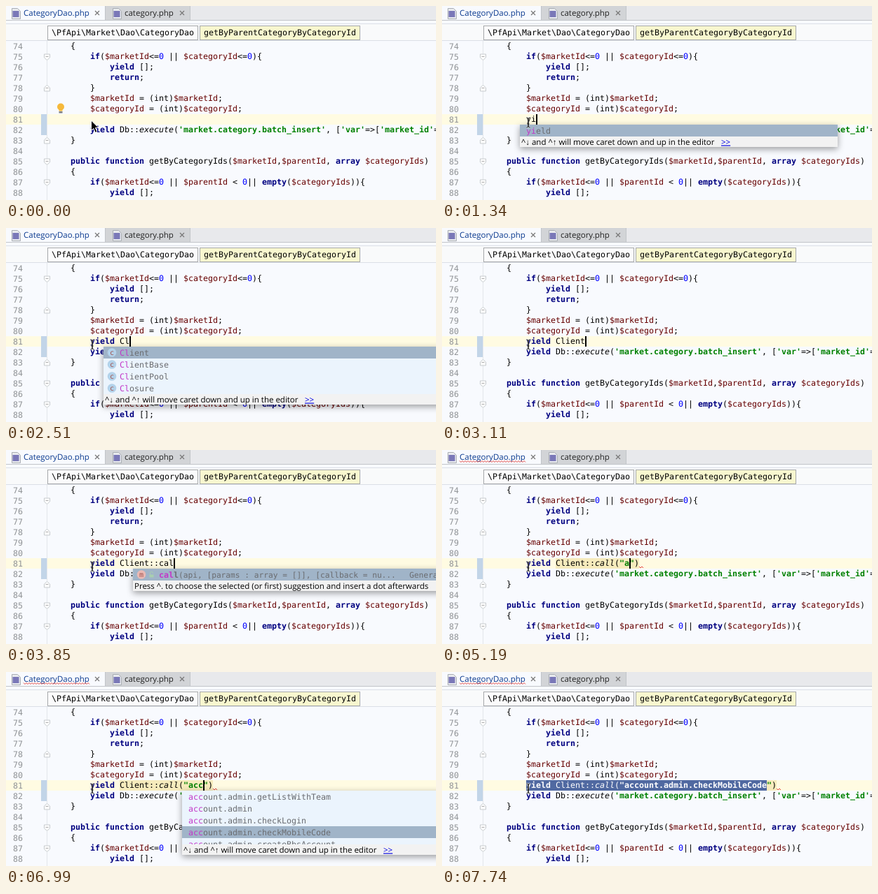
An HTML page for the animation above (8 s loop, 613 by 278 pixels).

```html
<!DOCTYPE html>
<html lang="en">
<head>
<meta charset="utf-8">
<style>
html, body { margin: 0; width: 100%; height: 100%; overflow: hidden; background: #f8fafe; }
svg { display: block; width: 613px; height: 278px; }
text { white-space: pre; text-rendering: geometricPrecision; font: 11.63px "DejaVu Sans Mono", monospace; }
.ui { font: 500 11.5px "Open Sans", sans-serif; }
.kw { fill: #000080; font-weight: bold; }
.var { fill: #660000; }
.num { fill: #0000ff; }
.str { fill: #008000; font-weight: bold; }
.call { font-style: italic; }
.item { fill: #6a6c70; }
.bold { font-weight: bold; }
.hit { fill: #c238c8; }
.picked text, .picked tspan { fill: #fff; }
.popup { filter: drop-shadow(0 3px 5px rgba(0, 0, 0, .38)); }
</style>
</head>
<body>
<svg viewBox="0 0 613 278" xmlns="http://www.w3.org/2000/svg">
  <g id="back"></g>
  <g id="live"></g>
</svg>
<script>
const LOOP = 8000, CHAR = 7, LEFT = 64, ROW = 15, FIRST = 74, LIST_ROW = 17;
const INDENT = 8, TYPED = 81;

const colX = c => LEFT + c * CHAR;
const rowY = n => 50 + (n - FIRST) * ROW;
const esc = s => s.replace(/&/g, '&amp;').replace(/</g, '&lt;').replace(/>/g, '&gt;');
const rect = (x, y, w, h, fill, more = '') =>
  `<rect x="${x}" y="${y}" width="${w}" height="${h}" fill="${fill}" ${more}/>`;
const path = (d, stroke, more = 'fill="none"') => `<path d="${d}" stroke="${stroke}" ${more}/>`;
const label = (x, y, body, more = '') => `<text x="${x}" y="${y}" ${more}>${body}</text>`;
const span = (cls, s) => `<tspan class="${cls}">${esc(s)}</tspan>`;

const TOKEN = /('[^']*'|"[^"]*")|(\$\w+)|\b(yield|return|if|public|function|empty|array)\b|(\b\d+\b)|((?<=::)\w+(?=\([^)]))/g;
const CLASSES = ['str', 'var', 'kw', 'num', 'call'];

function paint(code) {
  let out = '', last = 0;
  for (const m of code.matchAll(TOKEN)) {
    out += esc(code.slice(last, m.index)) + span(CLASSES[m.slice(1).findIndex(Boolean)], m[0]);
    last = m.index + m[0].length;
  }
  return out + esc(code.slice(last));
}
const codeLine = (n, indent, code) => label(colX(indent), rowY(n) + 11.4, paint(code));

function wave(x, y, w) {
  let d = `M${x} ${y}`;
  for (let i = 2; i <= w; i += 2) d += `L${x + i} ${y + (i % 4 ? 2 : 0)}`;
  return path(d, '#e0302a', 'fill="none" stroke-width=".9"');
}

const source = [
  [4, '{'],
  [8, 'if($marketId<=0 || $categoryId<=0){'],
  [12, 'yield [];'],
  [12, 'return;'],
  [8, '}'],
  [8, '$marketId = (int)$marketId;'],
  [8, '$categoryId = (int)$categoryId;'],
  [8, ''],
  [8, "yield Db::execute('market.category.batch_insert', ['var'=>['market_id'=>$marketId"],
  [4, '}'],
  [4, ''],
  [4, 'public function getByCategoryIds($marketId,$parentId, array $categoryIds)'],
  [4, '{'],
  [8, 'if($marketId<=0 || $parentId < 0|| empty($categoryIds)){'],
  [12, 'yield [];'],
];

function fold(n, closing) {
  const y = rowY(n) + 8, s = closing ? -1 : 1;
  return path(`M54.5 ${y - 4 * s}h8v${5 * s}l-4 ${3.5 * s}l-4 ${-3.5 * s}z`, '#c6cacd', 'fill="#fff"') +
    path(`M56.5 ${y - .5}h4`, '#aaa');
}

function tab(x, name, fill, closeX) {
  return path(`M${x} 3.5h8l4 4v11h-12z`, '#a9adb3', 'fill="#e9ebee"') +
    rect(x + 1, 7, 9, 9, '#7a78b8') +
    label(x + 16.5, 14, name, `class="ui" fill="${fill}"`) +
    path(`M${closeX - 3} 7l6 6m0-6l-6 6`, '#777', 'fill="none" stroke-width="1.2"');
}

function crumb(x, w, name, fill) {
  return rect(x - .5, 28.5, w + 1, 20, fill, 'stroke="#a6a8aa"') + label(x + 5, 42, name);
}

function backdrop() {
  let s = rect(0, 0, 613, 278, '#f8fafe') + rect(0, 25, 613, 24, '#f9fafb') +
    rect(0, 0, 613, 21, '#e8e9ec') + rect(0, 0, 141, 21, '#f8fafe') +
    rect(141, 0, 122, 21, '#d2d4d7') +
    path('M141.5 0v21M262.5 0v21M0 20.5h613', '#c2c5c9') +
    path('M0 25.5h613M0 49.5h613', '#dbdfe6') +
    tab(8.5, 'CategoryDao.php', '#0b3a8f', 130) +
    tab(152.5, 'category.php', '#222', 251) +
    crumb(60, 213, '\\PfApi\\Market\\Dao\\CategoryDao', '#fbfbfc') +
    crumb(277, 227, 'getByParentCategoryByCategoryId', '#f8f7cf') +
    rect(0, rowY(TYPED), 613, ROW, '#fffbe2') +
    path('M58.5 50v228', '#e3e6ea') +
    rect(50, rowY(TYPED), 8, 2 * ROW, '#c2d5e8');
  source.forEach(([indent, code], i) => {
    const n = FIRST + i;
    s += label(10, rowY(n) + 12, n, 'fill="#909396"') + codeLine(n, indent, code);
  });
  return s + fold(75) + fold(78, true) + fold(83, true) + fold(85) + fold(87);
}

const DOT = 'Press ^. to choose the selected (or first) suggestion and insert a dot afterwards';
const MOVE = '^↓ and ^↑ will move caret down and up in the editor';
const lists = {
  word: { x: 111, w: 453, pad: 9, hint: MOVE,
    rows: ['yield', 'yaml_emit', 'yaml_emit_file', 'yaml_parse', 'yaml_parse_file'] },
  type: { x: 139, w: 490, pad: 23, icons: 'c', hint: MOVE,
    rows: ['Client', 'ClientBase', 'ClientPool', 'Closure', 'Category', 'Config'] },
  method: { x: 181, w: 450, pad: 37, icons: 'm', hint: DOT,
    rows: ['call|(api, [params : array = []], [callback = nu...', 'close|()', 'config|(name)', 'connect|()', 'create|()'] },
  api: { x: 251, w: 380, pad: 9, hint: MOVE,
    rows: ['getListWithTeam', '', 'checkLogin', 'checkMobileCode', 'createBbsAccount']
      .map(s => 'account.admin' + (s && '.' + s)) },
};

function badge(x, y, letter) {
  const method = letter === 'm';
  let s = `<circle cx="${x}" cy="${y}" r="6.3" fill="${method ? '#eab9b4' : '#b3d2ea'}"/>` +
    label(x, y + 3.5, letter, 'text-anchor="middle" fill="#a0524e" style="font-size:10px"');
  if (method) s += rect(x + 11.5, y, 6, 4, '#a9cfb0') +
    path(`M${x + 12.5} ${y}v-2a2 2 0 0 1 4 0`, '#a9cfb0');
  return s;
}

function popup({ x, w, pad, icons, hint, rows }, prefix, sel) {
  const top = rowY(TYPED) + ROW, shown = rows.filter(r => r.startsWith(prefix));
  const h = Math.min(shown.length * LIST_ROW, 77), end = top + h;
  let s = rect(x, top, w, h + 15, '#ebf4fd') + rect(x, top + sel * LIST_ROW, w, LIST_ROW, '#a0b4c8');
  shown.forEach((row, i) => {
    const y = top + i * LIST_ROW, [name, tail = ''] = row.split('|'), n = prefix.length;
    const small = 'class="item" style="font-size:11.2px"';
    if (icons) s += badge(x + 12, y + 8.5, icons);
    s += label(x + pad, y + 12.5, span('hit', name.slice(0, n)) + esc(name.slice(n)),
        `class="item ${icons === 'm' ? 'bold' : ''}"`) +
      label(x + pad + name.length * CHAR, y + 12.5, esc(tail), small) +
      (icons === 'm' ? label(575, y + 12.5, 'General', small) : '');
  });
  s += rect(x, end, w, 15, '#f2f2f2') + label(x + 2, end + 11.5, esc(hint), 'class="ui"');
  if (hint === MOVE) s += label(x + 287, end + 11.5, '&gt;&gt;',
    'class="ui" fill="#0000e0" text-decoration="underline"');
  return `<g class="popup">${s}</g>`;
}

// Each step: start, code, caret column (-1 hides it), list name, list row, selected columns
const steps = [[0, '', -1], [450, '', -1]];
function type(times, base, word, list = '') {
  times.forEach((t, i) => {
    const code = base + word.slice(0, i + 1);
    steps.push([t, code, code.length, list, 0]);
  });
}
const CALL = 'yield Client::call(', DONE = CALL + '"account.admin.checkMobileCode")';
type([1190, 1340, 1490, 1630], '', 'yiel', 'word');
type([1780, 1930], 'yiel', 'd ');
type([2220, 2370, 2520, 2670, 2810, 2960], 'yield ', 'Client', 'type');
steps.push([3110, 'yield Client', 12]);
type([3260, 3410], 'yield Client', '::');
type([3550, 3700, 3850], 'yield Client::', 'cal', 'method');
steps.push(
  [4300, CALL + ')', 19],
  [4600, CALL + '"")', 20],
  [5190, CALL + '"a")', 21],
  [5490, CALL + '"a")', 21, 'api', 0],
  [5640, CALL + '"ac")', 22, 'api', 0],
  [5790, CALL + '"acc")', 23, 'api', 0],
  [6390, CALL + '"acc")', -1, 'api', 0],
  [6540, CALL + '"acc")', 23, 'api', 1],
  [6690, CALL + '"acc")', 23, 'api', 2],
  [6990, CALL + '"acc")', 23, 'api', 3],
  [7140, DONE, 49],
  [7590, DONE, 0, '', 0, 49],
  [7740, DONE, -1, '', 0, 49]);

const BULB = '<circle cx="78" cy="144.5" r="5" fill="#f6b93b"/>' +
  rect(75.5, 148, 5, 2.5, '#f6b93b') + rect(75.5, 151, 5, 2.5, '#7d7f82');
const ARROW = path('M121.5 164v14.5l3.3-3 2.5 5.8 2.6-1.1-2.5-5.6h4.6z', '#fff', 'fill="#000"');
const BEAM_D = 'M120.5 160q2.5 0 2.5 2v10q0 2-2.5 2M125.5 160q-2.5 0-2.5 2v10q0 2 2.5 2M121.5 169h3';
const BEAM = path(BEAM_D, '#fff', 'fill="none" stroke-width="2.4" opacity=".6"') + path(BEAM_D, '#111');

function scene([t, code, caret, list, row, picked]) {
  const y = rowY(TYPED), x = colX(INDENT), end = x + code.length * CHAR;
  const line = codeLine(TYPED, INDENT, code);
  let s = '';
  if (t >= 4600) s += rect(x + 6 * CHAR, y, end - x - 6 * CHAR, ROW, '#f6ebbc');
  s += line;
  if (t >= 4600) s += wave(end, y + 12, 6);
  if (t >= 5190) s += wave(25, 15.5, 94);
  if (picked) {
    const area = rect(x, y, picked * CHAR, ROW, '#5069a1');
    s += `<clipPath id="pick">${area}</clipPath>${area}<g class="picked" clip-path="url(#pick)">${line}</g>`;
  }
  if (caret >= 0) s += rect(x + caret * CHAR - (caret ? 0 : 1), y, 2, ROW, '#000');
  if (list) {
    const before = code.replace(/"\)$/, '');
    s += popup(lists[list], before.match(/\w*$/)[0], row);
  }
  return s + (t < 450 ? BULB + ARROW : BEAM);
}

const live = document.getElementById('live');
document.getElementById('back').innerHTML = backdrop();
let current;
function draw(now) {
  const t = now % LOOP, step = steps.findLast(s => s[0] <= t);
  if (step !== current) live.innerHTML = scene(current = step);
}
const start = performance.now();
function tick() {
  draw(performance.now() - start);
  requestAnimationFrame(tick);
}
tick();
</script>
</body>
</html>
```
